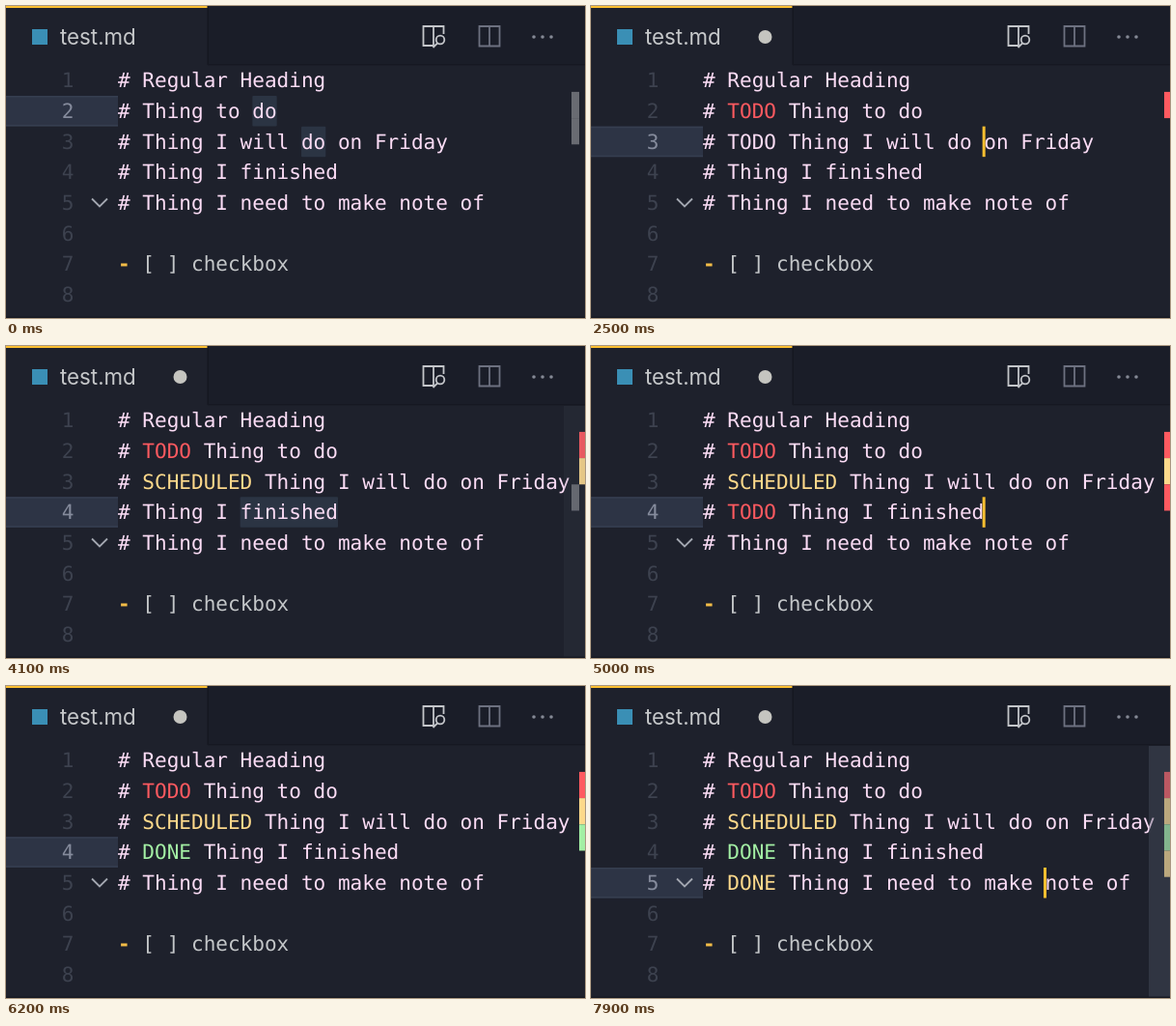
Animation, 600 px wide and 323 px high, one loop 8 s. Source, as an HTML page:

```html
<!DOCTYPE html>
<html lang="en">
<head>
<meta charset="utf-8">
<title>Heading keywords</title>
<style>
  html, body { margin: 0; width: 100%; height: 100%; overflow: hidden; background: #1e212c; }
  svg { display: block; width: 600px; height: 323px; }
  .code text { font: 21.04px "DejaVu Sans Mono", "Noto Sans Mono", monospace; white-space: pre; text-rendering: geometricPrecision; }
  .tab { font: 22.3px Inter, "Open Sans", sans-serif; }
</style>
</head>
<body>
<svg viewBox="0 0 600 323">
  <rect width="600" height="323" fill="#1e212c"/>
  <rect width="600" height="61" fill="#1a1d28"/>
  <rect width="209" height="61" fill="#1e212c"/>
  <rect width="209" height="2" fill="#fcbf30"/>
  <rect x="208.5" width="1.5" height="61" fill="#151720"/>
  <rect x="209" y="60" width="391" height="1.5" fill="#161822"/>
  <rect x="27" y="24" width="16" height="16" fill="#3a8fb5"/>
  <text class="tab" x="56" y="40" fill="#c6c8ca">test.md</text>
  <circle id="dirty" cx="180.5" cy="32" r="7" fill="#c5c5c0"/>
  <g fill="none" stroke="#c3c5c9" stroke-width="1.8">
    <path d="M443 41H432.500V21H453.500V29M443 21V41"/>
    <circle cx="450" cy="35" r="4.300"/>
    <path d="M447 38.500L442.500 43"/>
  </g>
  <path d="M490.500 21H511.500V41.500H490.500ZM501 21V41.500" fill="none" stroke="#6d7180" stroke-width="1.8"/>
  <g fill="#858995">
    <circle cx="547" cy="32" r="1.800"/><circle cx="556" cy="32" r="1.800"/><circle cx="565" cy="32" r="1.800"/>
  </g>
  <g id="band">
    <rect width="116" height="31.500" fill="#2d3445"/>
    <path d="M0 .75H116M0 30.750H116" stroke="#363e50" stroke-width="1.5"/>
  </g>
  <g id="marks" fill="#2b3443"></g>
  <g id="code" class="code"></g>
  <path d="M89 199.500L97 207.500L105 199.500" fill="none" stroke="#a3a7b1" stroke-width="1.800"/>
  <rect id="caret" width="3" height="31.500" fill="#fbbf30"/>
  <g id="ruler"></g>
  <rect id="slider" x="578" y="62" width="22" height="261" fill="#4e5666" fill-opacity=".376"/>
  <rect y="321.500" width="600" height="1.500" fill="#171a23"/>
</svg>
<script>
const LOOP = 8000, LEFT = 116, CHAR = 12.667, ROW = 31.67, TOP = 61.3, LANE = 27.2;
const PINK = '#fbdcf5', RED = '#ff5a60', YELLOW = '#fdd98b', GREEN = '#a3efa4';
const $ = id => document.getElementById(id);
const colX = col => LEFT + col * CHAR;
const rowY = row => TOP + row * ROW;

const bodies = ['Regular Heading', 'Thing to do', 'Thing I will do on Friday',
  'Thing I finished', 'Thing I need to make note of'];

// Keyword text per row, and its tint, which follows a little later
const words = {
  1: [[700, 'TODO']],
  2: [[2500, 'TODO'], [3000, 'SCHEDULED']],
  3: [[4600, 'TODO'], [5100, 'SCHEDULED'], [5600, 'DONE']],
  4: [[6900, 'TODO'], [7500, 'SCHEDULED'], [7900, 'DONE']]
};
const tints = {
  1: [[900, RED]],
  2: [[2700, RED], [3200, YELLOW]],
  3: [[4900, RED], [5300, YELLOW], [5900, GREEN]],
  4: [[7200, RED], [7700, YELLOW]]
};
// time, row, column
const moves = [[-500, 1, 13], [700, 1, 18], [1700, 2, 18], [2500, 2, 23], [3000, 2, 28],
  [3600, 3, 18], [4600, 3, 23], [5100, 3, 28], [5600, 3, 23],
  [6400, 4, 23], [6900, 4, 28], [7500, 4, 33], [7900, 4, 28]];
// start, end, then [row, column, length] for each matching word
const matches = [
  [0, 700, [1, 11, 2], [2, 15, 2]],
  [2000, 2500, [2, 18, 2]],
  [3900, 4600, [3, 10, 8]],
  [6650, 6900, [4, 23, 4]]
];
// time, slider opacity
const fades = [[0, 0], [3050, 0], [3150, 1], [3550, 1], [4400, 0], [7600, 0], [7700, 1], [8000, 1]];

const latest = (steps = [], t) => steps.filter(s => s[0] <= t).pop();

function ramp(keys, t) {
  const i = keys.findIndex(k => k[0] > t);
  const [t0, a] = keys[i - 1], [t1, b] = keys[i];
  return a + (b - a) * (t - t0) / (t1 - t0);
}

function add(parent, tag, attrs, text = '') {
  const el = document.createElementNS('http://www.w3.org/2000/svg', tag);
  for (const key in attrs) el.setAttribute(key, attrs[key]);
  el.textContent = text;
  return parent.appendChild(el);
}

const numbers = [], rows = [];
for (let i = 0; i < 8; i++) {
  const y = 84.3 + i * ROW;
  numbers.push(add($('code'), 'text', { x: 70.5, y, 'text-anchor': 'end' }, i + 1));
  if (i < bodies.length) {
    const line = add($('code'), 'text', { x: LEFT, y, fill: PINK });
    add(line, 'tspan', {}, '# ');
    rows.push({ word: add(line, 'tspan', {}), body: add(line, 'tspan', {}) });
  }
}
const list = add($('code'), 'text', { x: LEFT, y: 84.3 + 6 * ROW });
add(list, 'tspan', { fill: '#f3bd48', 'font-weight': 'bold' }, '-');
add(list, 'tspan', { fill: '#c3c6c8' }, ' [ ] checkbox');

function lane(row, x, width, fill) {
  add($('ruler'), 'rect', { x, y: 61.7 + row * LANE, width, height: LANE, fill });
}

function draw(t) {
  const [since, row, col] = latest(moves, t);
  $('band').setAttribute('transform', `translate(0 ${rowY(row)})`);
  numbers.forEach((n, i) => n.setAttribute('fill', i === row ? '#858b9c' : '#3d424f'));
  $('caret').setAttribute('x', colX(col) - 1.7);
  $('caret').setAttribute('y', rowY(row));
  $('caret').style.opacity = Math.floor((t - since) / 500) % 2 ? 0 : 1;
  $('dirty').style.opacity = t < 700 ? 0 : 1;
  $('slider').style.opacity = ramp(fades, t);

  $('marks').replaceChildren();
  $('ruler').replaceChildren();
  for (const [start, end, ...spans] of matches) {
    if (t < start || t >= end) continue;
    for (const [r, c, length] of spans) {
      add($('marks'), 'rect', { x: colX(c), y: rowY(r), width: length * CHAR, height: 31.5, rx: 1 });
      lane(r, 586, 8, '#696b72');
    }
  }
  rows.forEach(({ word, body }, i) => {
    const text = latest(words[i], t), tint = latest(tints[i], t);
    word.textContent = text ? text[1] : '';
    word.setAttribute('fill', tint ? tint[1] : PINK);
    body.textContent = (text ? ' ' : '') + bodies[i];
    if (tint) lane(i, 594, 6, tint[1]);
  });
}

let begin;
function tick(now) {
  begin ??= now;
  draw((now - begin) % LOOP);
  requestAnimationFrame(tick);
}
draw(0);
requestAnimationFrame(tick);
</script>
</body>
</html>
```
